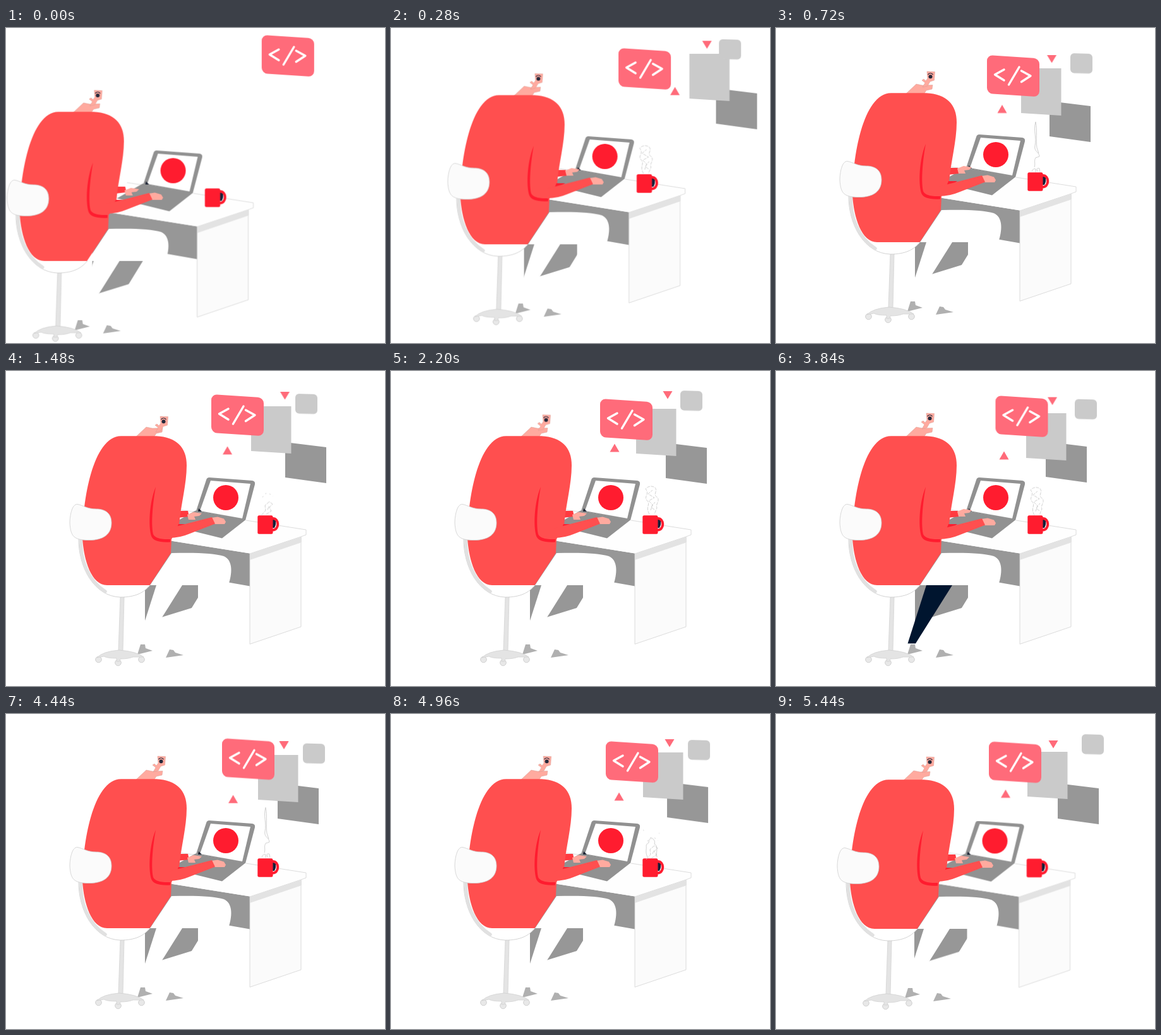
An HTML page for the animation above (5.48 s loop, 600 by 500 pixels).

```html
<!DOCTYPE html>
<html lang="en">
<head>
<meta charset="utf-8">
<title>Working at a desk</title>
<style>
  :root { --loop: 5480ms; }
  html, body { margin: 0; width: 100%; height: 100%; overflow: hidden; background: #fff; }
  svg { display: block; width: 600px; height: 500px; }

  .man, .desk, .float, .head { animation: var(--loop) ease-in-out infinite; }
  .man { animation-name: slide; --x: -100px; --y: 30px; --ox: -4px; --oy: 1px; }
  .desk { animation-name: slide; --x: -84px; --y: 25.6px; --ox: -1.5px; --oy: .5px; }
  .head { animation-name: nod; }
  .code { animation-name: code; }
  .mid { animation-name: mid; }
  .dark { animation-name: dark; }
  .small { animation-name: small; }
  .upper { animation-name: upper; }
  .lower { animation-name: lower; }

  .hand { animation: type calc(var(--loop) / 12) linear infinite; }
  .far { --d: 5px; }
  .near { --d: -2px; }
  .trouser { animation: flash var(--loop) step-end infinite; }
  .steam > g {
    --p: calc(var(--loop) / 3);
    opacity: 0;
    animation: puff var(--p) linear calc(var(--p) * var(--at)) infinite;
  }

  @keyframes slide {
    0% { transform: translate(var(--x), var(--y)); animation-timing-function: cubic-bezier(.16, .6, .3, 1); }
    10.5% { transform: none; }
    95% { transform: none; animation-timing-function: ease-in; }
    99.2%, 100% { transform: translate(var(--ox), var(--oy)); }
  }
  @keyframes nod {
    0%, 13.1% { transform: none; }
    27% { transform: translate(5px, 3px); }
    53.3% { transform: translate(-3px, -2px); }
    70% { transform: translate(-1px, -2px); }
    81% { transform: translate(1px, -2px); }
    99.2%, 100% { transform: translate(3px, -2px); }
  }
  @keyframes type {
    0%, 28%, 70%, 100% { transform: translateY(var(--d)); }
    34%, 64% { transform: none; }
  }
  @keyframes flash {
    0% { fill: #fff; }
    69.4% { fill: #00152f; }
    71.4%, 100% { fill: #fff; }
  }
  @keyframes puff {
    0% { opacity: 1; transform: translateY(2px); }
    23.9% { opacity: 1; transform: translateY(-2px); }
    24%, 100% { opacity: 0; transform: translateY(-2px); }
  }

  @keyframes code {
    0% { transform: translate(405px, 11px); animation-timing-function: ease-out; }
    10.95% { transform: translate(336px, 43px); }
    13.1% { transform: translate(334px, 43px); }
    27% { transform: translate(325px, 37px); }
    40% { transform: translate(331px, 44px); }
    53.3% { transform: translate(343.5px, 48.5px); }
    70% { transform: translate(347.5px, 39px); }
    81% { transform: translate(342px, 38.5px); }
    90% { transform: translate(340px, 43px); }
    99.2%, 100% { transform: translate(337px, 43.5px); }
  }
  @keyframes mid {
    0% { transform: translate(620px, 0); animation-timing-function: ease-out; }
    10.95% { transform: translate(393px, 63px); }
    13.1% { transform: translate(388px, 64px); }
    27% { transform: translate(388px, 56px); }
    40% { transform: translate(388px, 60px); }
    53.3% { transform: translate(388px, 67px); }
    70% { transform: translate(396px, 67px); }
    81% { transform: translate(399px, 65px); }
    90% { transform: translate(399px, 61px); }
    99.2%, 100% { transform: translate(398px, 60px); }
  }
  @keyframes dark {
    0% { transform: translate(690px, 70px); animation-timing-function: ease-out; }
    10.95% { transform: translate(520px, 122px); }
    13.1% { transform: translate(498px, 124px); }
    27% { transform: translate(507px, 121px); }
    40% { transform: translate(500px, 122px); }
    53.3% { transform: translate(488px, 124px); }
    70% { transform: translate(492px, 120px); }
    81% { transform: translate(495px, 118px); }
    90% { transform: translate(502px, 116px); animation-timing-function: ease-in; }
    99.2%, 100% { transform: translate(511px, 118px); }
  }
  @keyframes small {
    0% { transform: translate(605px, -20px); animation-timing-function: ease-out; }
    10.95% { transform: translate(473px, 38px); }
    13.1% { transform: translate(466px, 40px); }
    27% { transform: translate(458px, 36px); }
    40% { transform: translate(458px, 31px); }
    53.3% { transform: translate(464px, 29.5px); }
    70% { transform: translate(473px, 44.5px); }
    81% { transform: translate(470px, 46.5px); }
    90% { transform: translate(470px, 41px); animation-timing-function: ease-in; }
    99.2%, 100% { transform: translate(484px, 32px); }
  }
  @keyframes upper {
    0% { transform: translate(612px, -10px); animation-timing-function: ease-out; }
    10.95% { transform: translate(440px, 46px); }
    13.1% { transform: translate(436.5px, 49px); }
    27% { transform: translate(441.5px, 39px); }
    40% { transform: translate(438px, 38px); }
    53.3% { transform: translate(433.5px, 43.5px); }
    70% { transform: translate(437.5px, 47.5px); }
    81% { transform: translate(440px, 49.5px); }
    90% { transform: translate(441px, 46px); }
    99.2%, 100% { transform: translate(439px, 48px); }
  }
  @keyframes lower {
    0% { transform: translate(612px, 50px); animation-timing-function: ease-out; }
    10.95% { transform: translate(362px, 127px); }
    13.1% { transform: translate(358px, 128.5px); }
    27% { transform: translate(350.5px, 126px); }
    40% { transform: translate(354px, 122px); }
    53.3% { transform: translate(358.5px, 123.5px); }
    70% { transform: translate(361px, 134px); }
    81% { transform: translate(359.5px, 135px); }
    90% { transform: translate(361px, 131px); }
    99.2%, 100% { transform: translate(363.5px, 126.5px); }
  }
</style>
</head>
<body>
<svg viewBox="0 0 600 500">
  <!-- floating cards -->
  <path class="float dark" fill="#979797" d="M-65-8 0 0V57L-65 48Z"/>
  <path class="float mid" fill="#cacaca" d="M0 0H63.5V75L0 71Z"/>
  <g class="float small"><rect width="35" height="31.5" rx="6" fill="#cacaca" transform="skewY(1.5)"/></g>
  <g class="float code">
    <rect width="83" height="61" rx="9" fill="#ff6b7a" transform="skewY(3.6)"/>
    <path d="M27 23 12.5 31 27 40M51 19 34.5 47M54.5 25 69 33 54.5 42.5" fill="none" stroke="#fff" stroke-width="3.4" stroke-linecap="round" stroke-linejoin="round"/>
  </g>
  <path class="float upper" fill="#ff6b7a" d="M-7.5-6H7.5L0 6.5Z"/>
  <path class="float lower" fill="#ff6b7a" d="M-7.5 6.5H7.5L0-6.5Z"/>

  <g class="desk">
    <path fill="#979797" d="M236 265.500 386 289.500V341.500L304 327V373L220 399V330L236 300Z"/>
    <path fill="#fefefe" d="M262 219 302 223 475 252V260L386 289.500 245 267Z"/>
    <path fill="none" stroke="#d4d4d4" stroke-width=".8" d="M275 220 302 224M380 237 475 252V260L467 263"/>
    <path fill="#fbfbfb" stroke="#d4d4d4" stroke-width=".8" d="M386 290 467 263V406L386 433.500Z"/>
    <path fill="#e3e3e3" d="M386 290 468 263V272L386 300Z"/>

    <!-- laptop -->
    <path fill="#919191" d="M300 221.500 379 236.500 342 265.500 259 245Z"/>
    <path fill="#919191" d="M322 169 390 174Q395 175 394 180L379 237 301 222 317 173Q318 169 322 169Z"/>
    <path fill="#fff" d="M324 174 387 179 374 234 307 222Z"/>
    <circle cx="348" cy="201" r="20" fill="#ff1c2f"/>
    <path fill="#1b2233" d="M305 218 310 223H304Z"/>

    <!-- cup -->
    <path fill="#14203a" d="M421 234.500H426Q429 242 425 249H421Z"/>
    <path fill="none" stroke="#ff1c2f" stroke-width="4" d="M422 234C433 233.500 433 252.500 422 252.500"/>
    <rect x="398.300" y="229.300" width="24.200" height="29.500" rx="2.500" fill="#ff1c2f"/>
    <g class="steam" fill="none" stroke="#c4c4c4" stroke-width=".8">
      <g style="--at:.03" stroke-dasharray="5 1.500">
        <path d="M409 228C402 216 412 213 405 206C400 199 410 197 403 188Q410 181 418 186C423 192 414 196 421 201C427 207 418 212 421 218L417 228M411 222 414 213 408 207 417 202 407 196 414 190M417 221 412 217 418 209"/>
      </g>
      <g style="--at:.27">
        <path d="M411 149C407 163 413 174 410 187C408 196 417 197 417 204L411 206C408 211 411 215 409 221M411 149C414 164 411 177 413 190L416 199M405 228Q407 222 411 224L411 229M414 228Q411 221 417 223L418 229"/>
      </g>
      <g style="--at:.5">
        <path d="M406 229C402 220 405 217 404 210Q405 207 408 206Q408 198 414 199Q419 203 417 208C424 211 419 221 421 229"/>
        <path stroke-dasharray="1.500 24" d="M399 186 425 191"/>
      </g>
      <g style="--at:.71">
        <path stroke-dasharray="6 1.500" d="M404 229 411 221 410 213 417 207 422 211 417 216 420 222 412 227M414 220 417 213"/>
        <path stroke-dasharray="2 5" d="M406 200 411 194 418 195 423 199"/>
      </g>
    </g>
  </g>

  <g class="man">
    <!-- floor shadows -->
    <path fill="#b0b0b0" d="M213 434H220L221 440 232 444 208 450ZM259 442 265 443 268 447 281 451 253 455Z"/>

    <!-- chair -->
    <path fill="#e4e4e4" stroke="#d4d4d4" stroke-width=".8" d="M181 358H187L185 444H178Z"/>
    <g fill="#e8e8e8" stroke="#cfcfcf">
      <circle cx="146.500" cy="458" r="4.800"/>
      <circle cx="177.500" cy="463" r="4.800"/>
      <circle cx="214.500" cy="458" r="4.800"/>
    </g>
    <path fill="#e4e4e4" stroke="#cfcfcf" stroke-width=".7" d="M144 455Q153 445 179 443Q207 445 218 454L201 454Q194 457 181 457L180 461H175V456Q160 456 155 453Z"/>
    <path fill="#fff" stroke="#c8c8c8" stroke-width=".8" d="M115 264C114 312 140 358 181 359C205 359 218 352 228 340Z"/>
    <path fill="none" stroke="#e1e1e1" stroke-width="5.500" stroke-linecap="round" d="M118.500 266C117 300 130 333 157 350"/>

    <!-- legs -->
    <path fill="#fff" d="M262 289C300 288 330 289 345 294C360 301 358 322 352 340L340 400 280 420 294 376 316 340H228Z"/>
    <path class="trouser" fill="#fff" d="M238 340H279L221 432.500H208.500Z"/>

    <!-- neck and head -->
    <path fill="#ffaa9f" stroke="#d99a90" stroke-width=".5" d="M205 105 222 89 232 91 248 90.500 247 97 238 99 234 105Z"/>
    <g class="head">
      <path fill="#ffaa9f" stroke="#d99a90" stroke-width=".5" d="M231 83 234 81 237 84 240 80 239 69 251.500 69.500 250.500 83 244 85 240 92 232 94 236 87Z"/>
      <circle cx="244.500" cy="77.300" r="3" fill="#25293b"/>
      <path fill="none" stroke="#25293b" stroke-width="1.200" d="M240.500 74Q244.500 69.500 248.500 74"/>
    </g>

    <!-- far arm -->
    <path fill="#ff3a40" d="M274 222H288L290 231 272 233Z"/>
    <path class="hand far" fill="#ffaa9f" d="M287 223 297 219 310 221 306 225 298 226 300 231 289 231Z"/>

    <!-- torso -->
    <path fill="#ff4f4f" d="M182 103.200H238C270 105 286 121 286 150C286 180 277 210 274 245L262 267 261 289 227.500 340H160C135 340 123 300 121 265C121 207 137 104 182 103.200Z"/>
    <path fill="#ff1c2f" d="M237 184C227 208 225 245 230 262Q234 273 260 271.500V267Q237 268 233 259C229 240 233 207 237 184Z"/>
    <path fill="#ff1c2f" d="M268 256 273 243 287 243Z"/>
    <g class="hand near">
      <path fill="#ffaa9f" d="M325 235 335 233.500 345 236.500 348 241.500 346 245 329 245Z"/>
      <path fill="#ff4f4f" d="M258 252 270 248.500 326 234 331 244.500 290 260.500Q275 267 258 267Z"/>
    </g>

    <path fill="#fbfbfb" stroke="#cfcfcf" stroke-width=".8" d="M113 211.500C104 211 101 231 101 241C102 262 108 266 121 268C150 271 167 262 167 241C167 225 156 219 143 219C128 219 122 213 113 211.500Z"/>
  </g>
</svg>
</body>
</html>
```
